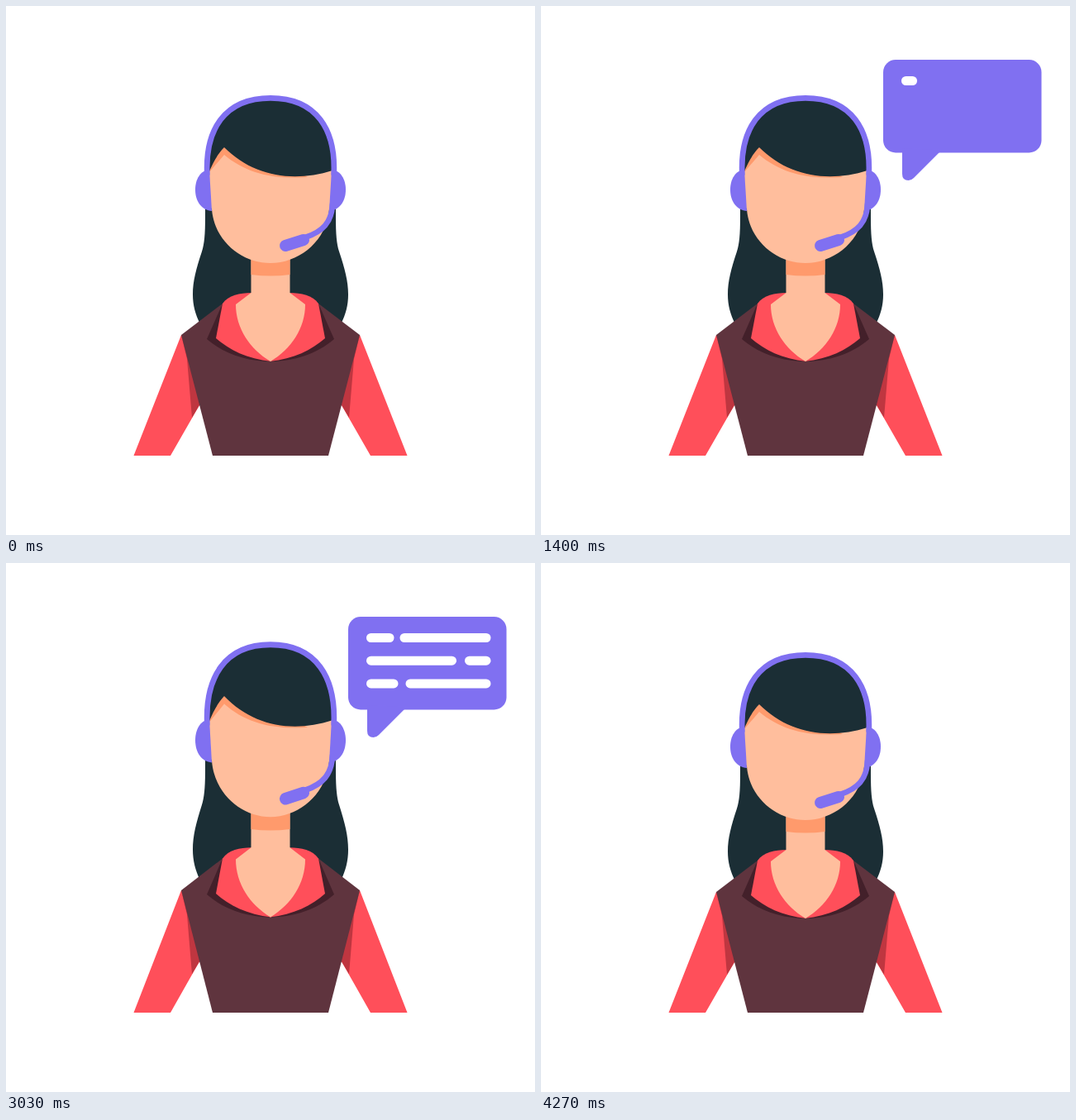
Animation of 640 by 640 pixels, one loop 4730 ms. Source, as an HTML page:

```html
<!DOCTYPE html>
<html lang="en">
<head>
<meta charset="utf-8">
<title>Support agent</title>
<style>
  html, body { margin: 0; width: 100%; height: 100%; overflow: hidden; background: #fff; }
  svg { display: block; width: 100%; height: 100%; }
  .hair { fill: #1b2e35; }
  .skin { fill: #ffbe9d; }
  .tan { fill: #ff9a6c; }
  .red { fill: #ff4f5a; }
  .fold { fill: #bf3640; }
  .vest { fill: #5f343e; }
  .dark { fill: #43202a; }
  .violet { fill: #8070f1; }
  .wire { fill: none; stroke: #8070f1; stroke-width: 6.7; stroke-linecap: round; }
</style>
</head>
<body>
<svg viewBox="0 0 640 640">
  <defs>
    <g id="sleeve">
      <path class="red" d="M212 398L154.500 544H199L234 483H240L225 398Z"/>
      <path class="fold" d="M212 398L219 427L225 498L234 483H240Z"/>
    </g>
    <path id="collar" class="red" d="M262 360C269 350 283 347 297 347H321V430C292 427 270 416 254 402Z"/>
    <path id="cup" class="violet" d="M246 198C235 199 229 210 229 222C229 237 237 247 249 248Z"/>
    <path id="lock" class="hair" d="M241 190V255C241 276 240 288 237 297C230 318 226 333 226 349C226 362 229 373 235 385L260 400H321V190Z"/>
  </defs>

  <g id="backHair">
    <use href="#lock"/>
    <use href="#lock" class="mirror"/>
  </g>

  <g id="body">
    <use href="#sleeve"/>
    <use href="#sleeve" class="mirror"/>
    <path class="vest" d="M212 398L262 360H378L428 398L390 544H250Z"/>
    <path class="dark" d="M262 360L243 403C285 439 355 439 397 403L378 360Z"/>
    <use href="#collar"/>
    <use href="#collar" class="mirror"/>
    <path class="skin" d="M296.500 290H343.500V347L362 361C362 390 345 415 320 430C295 415 278 390 278 361L296.500 347Z"/>
    <path class="tan" d="M296.500 290H343.500V325Q320 328 296.500 325Z"/>
  </g>

  <g id="head">
    <path class="skin" d="M244 180L246 240L249 246C252 284 285 311 320 311C355 311 388 284 391 246L394 240L396 180Z"/>
    <path class="tan" d="M246 201L247 192L264 165L365 207C322 210 290 202 264 180Z"/>
    <path class="hair" d="M246 200C245 145 268 111 320 111C372 111 395 150 395 199C347 214 299 206 264 171C257 178 251 188 246 200Z"/>
    <path class="wire" d="M243.300 203C241 150 264 111.300 320 111.300C376 111.300 399 150 396.700 203"/>
    <use href="#cup"/>
    <use href="#cup" class="mirror"/>
    <path class="wire" d="M395 240C394 262 383 273 362 280"/>
    <path class="wire" style="stroke-width:14" d="M338 290L360 283"/>
  </g>

  <g id="bubble">
    <rect class="violet" x="414" y="65" width="191.500" height="112.500" rx="15"/>
    <path class="violet" d="M437 172V203Q437 211 444.500 211Q448 211 451 208L485 174Z"/>
    <g id="lines" fill="#fff"></g>
  </g>
</svg>
<script>
const LOOP = 4730;
const FLOOR = 544, CHIN = 311;
const TEXT_LEFT = 436, TEXT_RIGHT = 586.5, TEXT_TOP = 85, ROW_STEP = 27.7;

const byId = id => document.getElementById(id);
const setAll = (node, attrs) => {
  for (const name in attrs) node.setAttribute(name, attrs[name]);
};
document.querySelectorAll(".mirror").forEach(node => setAll(node, { transform: "matrix(-1 0 0 1 640 0)" }));

// Sine-eased progress from 0 to 1 between two times.
function rise(t, start, end) {
  const progress = Math.min(1, Math.max(0, (t - start) / (end - start)));
  return (1 - Math.cos(Math.PI * progress)) / 2;
}
const pulse = (t, start, peak, end) => rise(t, start, peak) - rise(t, peak, end);

// Goes to one extreme, then to the opposite one, then back to rest.
const swing = (t, { start, peak, low, end }, first, second) =>
  first * pulse(t, start, peak, low) - second * pulse(t, peak, low, end);

const hello = { start: 30, peak: 500, low: 800, end: 1180 };
const goodbye = { start: 2600, peak: 3430, low: 3775, end: 4230 };
const evenly = (start, step) => ({ start, peak: start + step, low: start + 2 * step, end: start + 3 * step });
const wobbleIn = evenly(780, 200), wobbleOut = evenly(3285, 338);

const bodyScale = t => 1 + swing(t, hello, .027, .033) + swing(t, goodbye, .026, .028);

// The neck stretches on its own while the text is being written.
const headScale = t => 1 + swing(t, hello, .048, .028) + swing(t, goodbye, .014, .023)
  + .036 * (rise(t, 1670, 2300) - rise(t, goodbye.peak, goodbye.low));

// The head rides on the body and runs slightly ahead of it at the top of a stretch.
function headShift(t) {
  const lead = 100 * (swing(t, hello, 1, 0) + swing(t, goodbye, 1, 0));
  return (FLOOR - CHIN) * (1 - bodyScale(t + lead));
}

// Bars are written one after another; a wider bar takes longer.
const bars = [];
let clock = 1300;
function addBar(x, row, width) {
  const node = document.createElementNS("http://www.w3.org/2000/svg", "rect");
  setAll(node, { x, y: TEXT_TOP + row * ROW_STEP, height: 11, rx: 5.5, ry: 5.5 });
  byId("lines").append(node);
  const start = clock;
  clock += 107 + 2.35 * width;
  bars.push({ node, width, start, end: clock });
}
[{ first: 33.5, gap: 7 }, { first: 109, gap: 10 }, { first: 38.5, gap: 9 }].forEach(({ first, gap }, row) => {
  const second = TEXT_LEFT + first + gap;
  const pair = [[TEXT_LEFT, row, first], [second, row, TEXT_RIGHT - second]];
  if (row % 2) pair.reverse();
  pair.forEach(bar => addBar(...bar));
});

const stretch = (pivot, scale, shift) =>
  `translate(0 ${pivot + shift}) scale(1 ${scale}) translate(0 ${-pivot})`;

function draw(t) {
  const headPose = stretch(CHIN, headScale(t), headShift(t));
  setAll(byId("body"), { transform: stretch(FLOOR, bodyScale(t), 0) });
  setAll(byId("head"), { transform: headPose });
  setAll(byId("backHair"), { transform: headPose });

  const size = rise(t, 640, 960) - rise(t, 3930, 4220);
  const turn = swing(t, wobbleIn, 4.7, 3) - swing(t, wobbleOut, 6, 9);
  setAll(byId("bubble"), {
    transform: `translate(444 211) rotate(${turn}) scale(${size}) translate(-444 -211)`,
    visibility: size > .001 ? "visible" : "hidden"
  });
  for (const { node, width, start, end } of bars) setAll(node, { width: width * rise(t, start, end) });
}

const begin = performance.now();
function tick() {
  draw((performance.now() - begin) % LOOP);
  requestAnimationFrame(tick);
}
tick();
</script>
</body>
</html>
```
